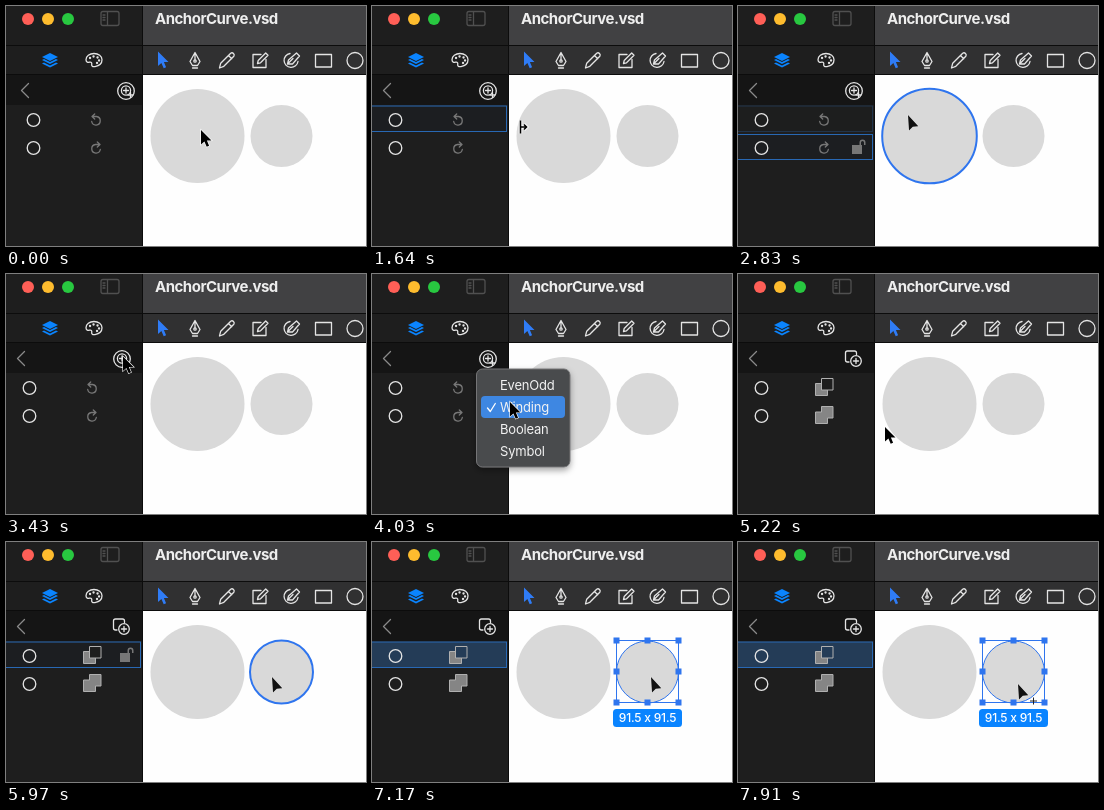
An HTML page that plays this animation: 360 px wide and 240 px high, repeating every 8000 ms.

```html
<!DOCTYPE html>
<html lang="en">
<head>
<meta charset="utf-8">
<title>Layer panel hover</title>
<style>
  html, body { margin: 0; height: 100%; overflow: hidden; background: #1e1e1e; }
  svg { display: block; width: 100vw; height: 100vh; font-family: Inter, Roboto, sans-serif; }
  .line { fill: none; stroke: #e4e4e4; stroke-width: 1.3; stroke-linejoin: round; stroke-linecap: round; }
  .dim { stroke: #777; }
  .mark { fill: none; stroke: #2f75ee; stroke-width: 2; }
  .row { fill: #1c1e21; stroke: #2868b4; }
</style>
</head>
<body>
<svg viewBox="0 0 360 240">
  <defs>
    <path id="pointer" d="M0 0V14.5L3.4 11.4 5.7 16.7 8.1 15.7 5.9 10.5H10.5Z"/>
    <path id="lock" fill="#777" d="M114 139h10v9h-10zM121.500 139v-2.500a3 3 0 0 1 6 0v2.500h-1.500v-2.500a1.500 1.500 0 0 0-3 0v2.500z"/>
    <g id="turn" class="line dim">
      <path d="M-3.500 -3.500H.5A4.300 4.300 0 1 1 -4.300 1.500M-1.300 -6L-4 -3.500-1.300 -1"/>
    </g>
    <filter id="shadow" x="-20%" y="-20%" width="140%" height="140%">
      <feDropShadow dx="0" dy="3" stdDeviation="3" flood-opacity=".35"/>
    </filter>
  </defs>

  <!-- window -->
  <path fill="#1e1e1e" d="M0 0h137v240H0z"/>
  <path fill="#414143" d="M137 0h223v39H137z"/>
  <path fill="#303031" d="M137 40h223v28H137z"/>
  <path fill="#fefefe" d="M137 69h223v171H137z"/>
  <path fill="#151515" d="M0 69h137v30H0z"/>
  <path fill="#0c0c0c" d="M0 39h360v1H0zM0 68h360v1H0zM136 0h1v240h-1z"/>
  <circle cx="22" cy="13" r="6" fill="#ff5f57"/>
  <circle cx="42" cy="13" r="6" fill="#febc2e"/>
  <circle cx="62" cy="13" r="6" fill="#28c840"/>
  <g class="line" style="stroke:#505050">
    <rect x="95" y="5.500" width="18" height="14" rx="2"/>
    <path d="M101.500 6v13M97 9h2M97 11.500h2M97 14h2"/>
  </g>
  <text x="149" y="18" fill="#eee" font-size="15" font-weight="700" letter-spacing="-.5">AnchorCurve.vsd</text>

  <!-- tabs and tools -->
  <g fill="#0a84ff">
    <path d="M44 47l8 4-8 4-8-4z"/>
    <path d="M36 54l2-1 6 3 6-3 2 1-8 4zM36 57.500l2-1 6 3 6-3 2 1-8 4z"/>
  </g>
  <g class="line">
    <path d="M88 47.500c-4.500 0-8 2.700-8 6.300 0 2.500 2 2.800 3.500 2.400 2-.5 2.500.8 2.200 2.200-.4 2 1.300 2.600 3.300 2.200 4-.7 7-3.300 7-6.800 0-3.600-3.500-6.300-8-6.300z"/>
    <path d="M84 52h.1M87.500 50.500h.1M91.500 51.500h.1M93 54.500h.1M91 57h.1" stroke-width="2.300"/>
  </g>
  <use href="#pointer" transform="translate(152 45.500)" fill="#2f7cf6"/>
  <g class="line">
    <path d="M189 46.500l-5 9 2.500 4h5l2.500-4zM189 47v7M186.500 62h5"/>
    <circle cx="189" cy="55" r="1.200"/>
    <path d="M213.500 62l1.200-4.800 10-10q1.500-1 2.800.3t.3 2.800l-10 10zM222.500 49.500l3.200 3.200"/>
    <path d="M255 48.500h-8v13h13v-8M251.500 57.500l.7-3 7.500-7.500 2.300 2.300-7.500 7.500z"/>
    <path d="M284 47.500a7 7 0 1 0 8 8M281.500 58l1-4 8-7 3 3-7 8zM282 57.500l5-5"/>
    <rect x="309.500" y="48.500" width="16" height="12.500"/>
    <circle cx="349" cy="54.500" r="8"/>
  </g>

  <!-- layer list -->
  <g id="panel">
    <g id="row1"><rect class="row" x="-.5" y="100" width="135" height="25.500"/><use href="#lock" y="-28"/></g>
    <g id="row2"><rect class="row" x="-.5" y="128.500" width="135" height="25"/><use href="#lock"/></g>
    <path class="line dim" d="M18.500 77.500l-7 7 7 7" stroke-width="1.800" style="stroke:#8a8a8a"/>
    <circle class="line" cx="23.500" cy="114" r="6.300"/>
    <circle class="line" cx="23.500" cy="142" r="6.300"/>
    <g id="winding">
      <g class="line">
        <circle cx="116" cy="85" r="8.300"/>
        <circle cx="116" cy="84.500" r="4.600"/>
        <path d="M113.500 84.500h5M116 82v5M118 89h5M120.500 86.500v5"/>
      </g>
      <use href="#turn" transform="translate(86 114)"/>
      <use href="#turn" transform="translate(86 142) scale(-1 1)"/>
    </g>
    <g id="boolean">
      <g class="line">
        <path d="M111 88h-1.500q-2 0-2-2v-7q0-2 2-2h7q2 0 2 2v1.500"/>
        <circle cx="118" cy="87" r="5.300"/>
        <path d="M115.500 87h5M118 84.500v5"/>
      </g>
      <g stroke="#b0b0b0">
        <path fill="#858585" d="M77.500 109.500h12v12h-12z"/>
        <path id="cut" fill="#1e1e1e" d="M83.500 104.500h11.500v11.500h-11.500z"/>
        <path fill="#858585" d="M83.500 132.500h11.500v11.500h-5.500v5.500h-12v-11.500h6z"/>
      </g>
    </g>
  </g>

  <!-- canvas -->
  <g fill="#d9d9d9">
    <circle cx="191.500" cy="130" r="47"/>
    <circle cx="275.500" cy="130" r="31"/>
  </g>
  <circle id="mark2" class="mark" cx="191.500" cy="130" r="47.300"/>
  <circle id="mark1" class="mark" cx="275.500" cy="130" r="31.500"/>
  <g id="selection">
    <g class="mark" style="stroke-width:1">
      <circle cx="275.500" cy="130" r="31"/>
      <path d="M244.500 98.500h62v62h-62z"/>
    </g>
    <g id="handles" fill="#2f75ee"></g>
    <rect x="241" y="167" width="69" height="18" rx="3.500" fill="#0a84ff"/>
    <text x="275.500" y="180.300" fill="#fff" font-size="12" font-weight="500" text-anchor="middle" letter-spacing="-.2">91.5 x 91.5</text>
  </g>

  <!-- menu -->
  <g id="menu">
    <rect x="104.500" y="95" width="93.500" height="98" rx="6" fill="#4a4b4d" stroke="#747577" filter="url(#shadow)"/>
    <rect id="pick" x="109" width="84" height="22" rx="4" fill="#3e87e2"/>
    <path class="line" style="stroke:#fff" stroke-width="1.600" d="M115.500 134l2.800 3.500 5-8"/>
    <g id="items" fill="#f2f2f2" font-size="13" letter-spacing="-.2"></g>
  </g>

  <g id="cursor">
    <use id="arrow" href="#pointer" fill="#000" stroke="#fff" stroke-width="1.200" paint-order="stroke"/>
    <path id="select" fill="#111" stroke="#eee" stroke-width=".8" paint-order="stroke" d="M0 0L1 15.500 4.800 11.800 10.300 11.300Z"/>
    <g id="resize" fill="none">
      <path stroke="#fff" stroke-width="3.500" d="M.5 -6.500V6.500M1 0H6M4 -2.500L6.500 0 4 2.500"/>
      <path stroke="#000" stroke-width="1.600" d="M.5 -6.500V6.500M1 0H6M4 -2.500L6.500 0 4 2.500"/>
    </g>
    <path id="plus" stroke="#222" d="M12 17h7M15.500 13.500v7"/>
  </g>
</svg>
<script>
  const LOOP = 8000, STEP = 149.2;
  const el = id => document.getElementById(id);
  const show = (id, on) => { el(id).style.display = on ? '' : 'none'; };
  const within = (n, from, to) => n >= from && n < to;

  // cursor path: step, x, y
  const path = [
    [0, 195, 124], [1, 182, 127], [4, 88, 134], [7, 88, 134], [8, 92, 118], [10, 122, 119],
    [11, 148, 121], [12, 200, 124], [13, 250, 127], [15, 272, 129], [17, 250, 122], [18, 212, 114],
    [19, 170, 109], [20, 146, 99], [22, 118, 83], [24, 116, 82], [27, 138, 128], [29, 147, 153],
    [35, 147, 153], [36, 170, 151], [38, 250, 139], [40, 266, 135], [43, 266, 135],
    [45, 279, 135], [48, 279, 135], [50, 280, 142], [53, 280, 142]
  ];
  // hovered spans per layer row
  const hovers = {
    1: [[8, 11], [13, 18], [38, 48]],
    2: [[1, 8], [12, 13], [18, 20], [36, 38]]
  };

  el('items').innerHTML = ['EvenOdd', 'Winding', 'Boolean', 'Symbol']
    .map((name, i) => `<text x="128" y="${116 + i * 22}">${name}</text>`).join('');
  for (let i = 0; i < 9; i++) {
    if (i === 4) continue;
    el('handles').innerHTML += `<rect x="${241.5 + i % 3 * 31}" y="${95.5 + Math.floor(i / 3) * 31}" width="6" height="6"/>`;
  }

  function cursorAt(n) {
    const i = Math.max(1, path.findIndex(p => p[0] >= n));
    const [a, ax, ay] = path[i - 1], [b, bx, by] = path[i];
    const k = (n - a) / (b - a);
    return [ax + (bx - ax) * k, ay + (by - ay) * k];
  }

  function drawRow(id, n, selected) {
    const hovered = hovers[id].some(([from, to]) => within(n, from, to));
    const fade = hovers[id].some(([, to]) => n === to) ? 1
      : hovers[id].some(([, to]) => n === to + 1) ? 0.3 : 0;
    const [box, lock] = el('row' + id).children;
    box.style.opacity = hovered || selected ? 1 : fade;
    box.style.fill = selected ? '#243c57' : '';
    lock.style.display = hovered ? '' : 'none';
    show('mark' + id, hovered);
  }

  function draw(n) {
    const selected = n >= 48, [x, y] = cursorAt(n);
    el('panel').setAttribute('transform', `translate(${[4, 2, 1][n] || 0})`);
    drawRow(1, n, selected);
    drawRow(2, n, false);
    show('selection', selected);
    el('cut').setAttribute('fill', selected ? '#243c57' : '#1e1e1e');

    show('winding', n < 33);
    show('boolean', n >= 33);
    show('menu', within(n, 24, 34));
    el('menu').style.opacity = n === 33 ? 0.4 : 1;
    const item = Math.floor((y - 100) / 22);
    show('pick', item >= 0 && n !== 32);
    el('pick').setAttribute('y', 100 + item * 22);

    const resizing = n === 11, selecting = within(n, 12, 20) || n >= 37;
    show('resize', resizing);
    show('select', selecting);
    show('arrow', !resizing && !selecting);
    show('plus', n >= 50);
    el('cursor').setAttribute('transform', `translate(${x} ${y})`);
  }

  function tick() {
    draw(Math.min(53, Math.floor((performance.now() % LOOP + 8) / STEP)));
    requestAnimationFrame(tick);
  }
  tick();
</script>
</body>
</html>
```
